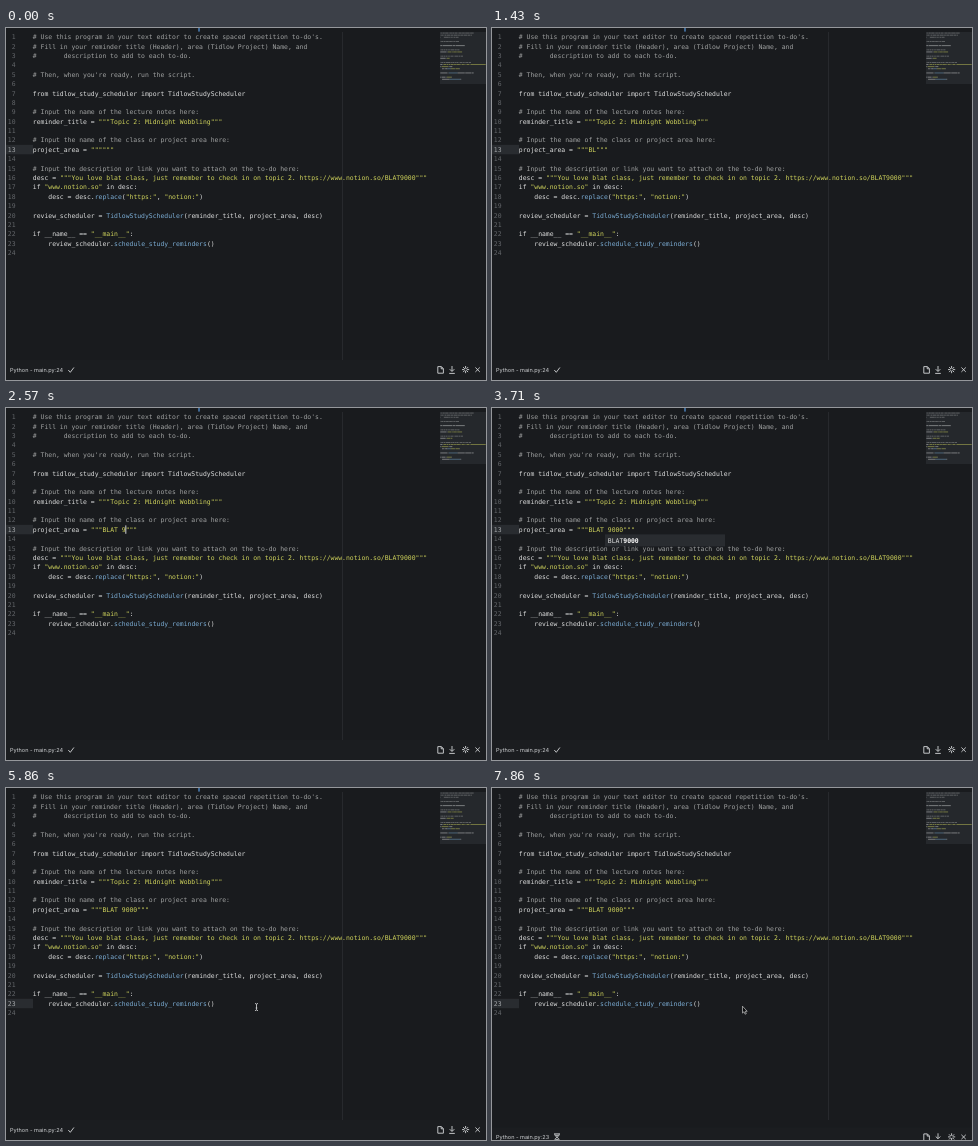
An HTML page that plays this animation: 480x352 px, repeating every 8 s.

```html
<!DOCTYPE html>
<html lang="en">
<head>
<meta charset="utf-8">
<title>Study scheduler</title>
<style>
  html, body { margin: 0; width: 100%; height: 100%; overflow: hidden; background: #191b1e; }
  svg { display: block; width: 100vw; height: 100vh; }
  text { white-space: pre; text-rendering: geometricPrecision; }
  .code text { font: 6.43px "DejaVu Sans Mono", monospace; }
  .plain { fill: #dedfdf; }
  .comment { fill: #a0a2a2; }
  .string { fill: #d0d45c; }
  .call { fill: #7caed6; }
  .number { fill: #63666a; text-anchor: end; }
  .number.active { fill: #a4a7aa; }
  .status { font: 5.55px Inter, "Open Sans", sans-serif; fill: #cfd1d3; }
  .icon { fill: none; stroke: #d3d5d7; stroke-width: .9; }
</style>
</head>
<body>
<svg viewBox="0 0 480 352" preserveAspectRatio="none">
  <rect width="480" height="352" fill="#191b1e"/>
  <rect id="modified" x="192.3" width="1.4" height="3.6" fill="#4d86c4"/>
  <path d="M336.5 4V332" stroke="#2b2e32" stroke-width=".8"/>
  <rect id="row" width="27" height="9.4" fill="#292c30"/>
  <g id="code" class="code"></g>

  <rect x="434" y="4" width="46" height="52" fill="#25282c"/>
  <g id="minimap" opacity=".5"></g>

  <rect id="caret" width=".9" height="8.4" fill="#e4e6e8"/>

  <g id="popup" class="code">
    <rect x="113" y="126.4" width="120" height="12" fill="#292c30"/>
    <text class="plain" x="115.8" y="134.5">BLAT<tspan font-weight="700" fill="#fff">9000</tspan></text>
  </g>

  <g id="bar">
    <rect y="332" width="480" height="28" fill="#1b1d20"/>
    <text id="status" class="status" x="4" y="344.1"></text>
    <path id="check" class="icon" d="M62.3 342l2 2.3 3.6-4.8" stroke-width="1.1"/>
    <path id="hourglass" class="icon" d="M62 338.6h6M62 345.4h6M62.8 338.8q0 2.2 2.2 3.2q-2.2 1-2.2 3.2M67.2 338.8q0 2.2-2.2 3.2q2.2 1 2.2 3.2M64 340h2M63.8 344.4h2.4"/>
    <path class="icon" d="M431.8 338.6h3.6l2 2v4.6h-5.6zM435.2 338.8v2h2"/>
    <path class="icon" d="M446 338v5M443.7 341.2l2.3 2.3 2.3-2.3M443.2 345.4h5.6" stroke-width="1.1"/>
    <path class="icon" d="M459.6 338v7.2M456 341.6h7.2M457.1 339.1l5 5M462.1 339.1l-5 5" stroke-width=".8"/>
    <circle cx="459.6" cy="341.6" r="1.2" fill="#1b1d20"/>
    <path class="icon" d="M469.4 339.5l4.4 4.4M473.8 339.5l-4.4 4.4" stroke-width="1.1"/>
  </g>

  <g id="mouse">
    <path id="beam" d="M-1.5-3.5Q0-3.4 0-2.5Q0-3.4 1.5-3.5M0-2.5V2.7M-1.5 3.6Q0 3.5 0 2.7Q0 3.5 1.5 3.6M-.8 1h1.6" fill="none" stroke="#dcdedf" stroke-width=".8"/>
    <path id="arrow" d="M0-.8V6.1L1.5 4.7 2.6 7.2 3.8 6.7 2.7 4.3H4.7Z" fill="#0c0d0e" stroke="#e2e4e5" stroke-width=".6"/>
  </g>
</svg>
<script>
const LOOP = 8000, LEFT = 26.8, CHAR = 3.87, TOP = 11.2, PITCH = 9.39;
const EDIT_ROW = 13, CALL_ROW = 23;
const SOURCE = `# Use this program in your text editor to create spaced repetition to-do's.
# Fill in your reminder title (Header), area (Tidlow Project) Name, and
#       description to add to each to-do.

# Then, when you're ready, run the script.

from tidlow_study_scheduler import TidlowStudyScheduler

# Input the name of the lecture notes here:
reminder_title = """Topic 2: Midnight Wobbling"""

# Input the name of the class or project area here:
project_area = """"""

# Input the description or link you want to attach on the to-do here:
desc = """You love blat class, just remember to check in on topic 2. https://www.notion.so/BLAT9000"""
if "www.notion.so" in desc:
    desc = desc.replace("https:", "notion:")

review_scheduler = TidlowStudyScheduler(reminder_title, project_area, desc)

if __name__ == "__main__":
    review_scheduler.schedule_study_reminders()
`.split("\n");

const TYPED = "BLAT 9000";
const KEYS = [710, 1000, 1570, 1720, 2000, 2430, 2700, 2850, 3000];
const POPUP = 3290, MOUSE_IN = 4140, CLICK = 5430, SAVE = 7140, RUN = 7430;

const $ = id => document.getElementById(id);
const show = (id, on) => $(id).setAttribute("visibility", on ? "visible" : "hidden");

function add(parent, tag, attrs, text = "") {
  const el = document.createElementNS("http://www.w3.org/2000/svg", tag);
  for (const key in attrs) el.setAttribute(key, attrs[key]);
  el.textContent = text;
  return parent.appendChild(el);
}

function tokens(line) {
  const list = [], pattern = /^#.*|"""[^"]*"""|"[^"]*"|\w+(?=\()/g;
  let end = 0;
  const push = (kind, from, to) => {
    if (to > from) list.push({ kind, col: from, text: line.slice(from, to) });
  };
  for (const match of line.matchAll(pattern)) {
    const word = match[0];
    push("plain", end, match.index);
    end = match.index + word.length;
    push(word[0] === "#" ? "comment" : word[0] === '"' ? "string" : "call", match.index, end);
  }
  push("plain", end, line.length);
  return list;
}

const baseline = row => TOP + (row - 1) * PITCH;

const rows = SOURCE.map((line, i) => ({
  number: add($("code"), "text", { class: "number", x: 9.5, y: baseline(i + 1) }, i + 1),
  code: add($("code"), "g", {}),
  mini: add($("minimap"), "g", {})
}));

function drawLine(row, line) {
  const { code, mini } = rows[row - 1];
  code.replaceChildren();
  mini.replaceChildren();
  for (const { kind, col, text } of tokens(line)) {
    add(code, "text", { class: kind, x: LEFT + col * CHAR, y: baseline(row) }, text);
    for (const word of text.matchAll(/\S+/g)) {
      add(mini, "rect", {
        class: kind, x: 434.3 + (col + word.index) * .445, y: 4.6 + (row - 1) * 2.1,
        width: word[0].length * .445, height: .9
      });
    }
  }
}
SOURCE.forEach((line, i) => drawLine(i + 1, line));

let shown = 0;
function render(t) {
  const count = KEYS.filter(key => key <= t).length;
  if (count !== shown) {
    shown = count;
    drawLine(EDIT_ROW, `project_area = """${TYPED.slice(0, count)}"""`);
  }

  const clicked = t >= CLICK, running = t >= RUN;
  const row = clicked ? CALL_ROW : EDIT_ROW;
  const col = clicked ? SOURCE[CALL_ROW - 1].length : 18 + count;
  const lastInput = clicked ? CLICK : count ? KEYS[count - 1] : -500;
  $("row").setAttribute("y", baseline(row) - 7);
  rows.forEach((r, i) => r.number.classList.toggle("active", i + 1 === row));
  $("caret").setAttribute("x", LEFT + col * CHAR - .3);
  $("caret").setAttribute("y", baseline(row) - 6.5);
  show("caret", !running && Math.floor((t - lastInput) / 400) % 2 === 0);

  show("popup", t >= POPUP && !clicked);
  show("modified", t < SAVE);

  const p = Math.min(1, Math.max(0, (t - MOUSE_IN) / 290));
  const rest = (1 - p) ** 3;
  $("mouse").setAttribute("transform", `translate(${250.5 - 8 * rest} ${219 - 10 * rest})`);
  show("beam", t >= MOUSE_IN && !running);
  show("arrow", running);

  $("bar").setAttribute("transform", `translate(0 ${running ? 7.3 : 0})`);
  $("status").textContent = `Python - main.py:${running ? 23 : 24}`;
  show("check", !running);
  show("hourglass", running);
}

const start = performance.now();
function tick() {
  render((performance.now() - start) % LOOP);
  requestAnimationFrame(tick);
}
tick();
</script>
</body>
</html>
```
